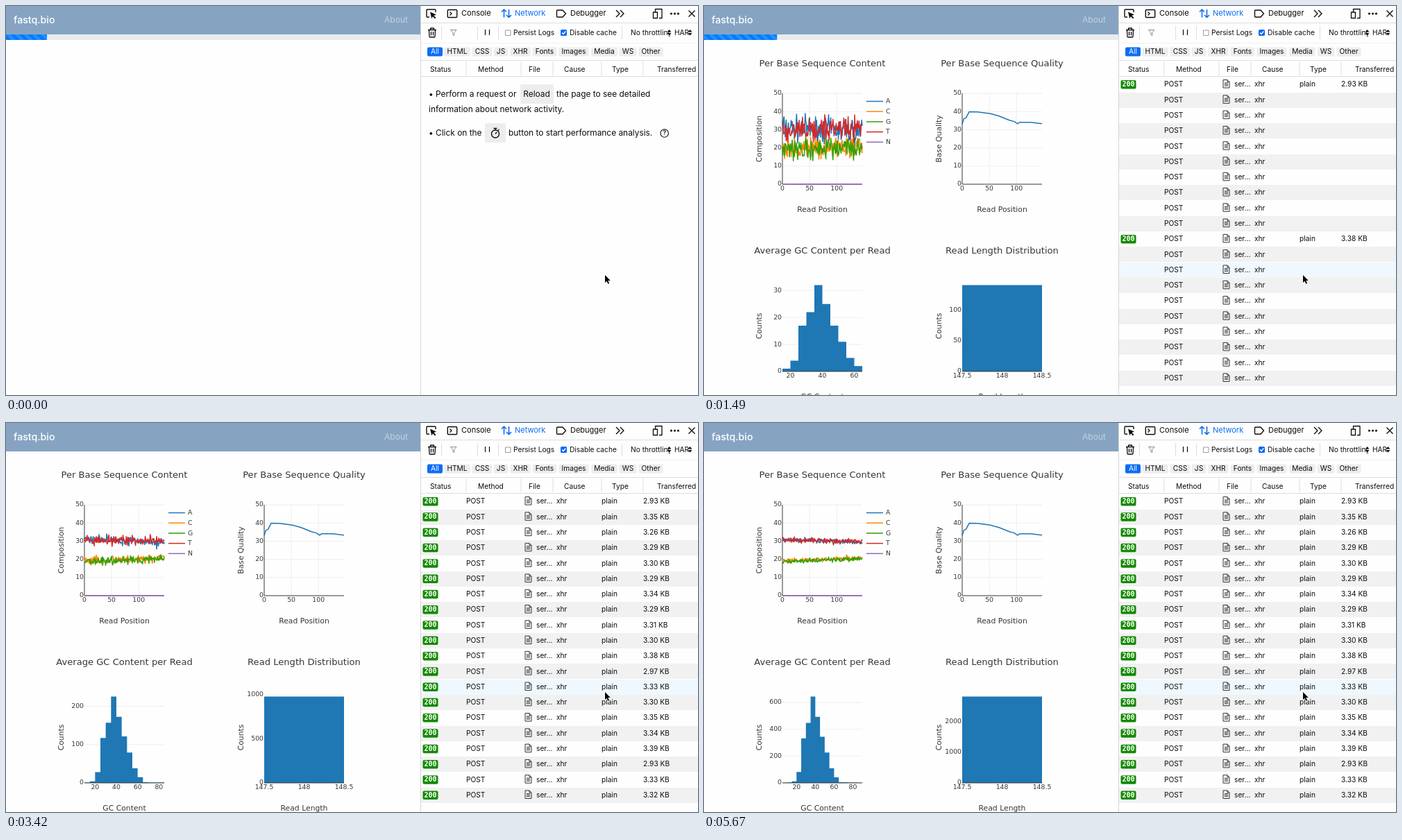
An HTML page with a canvas that plays this animation: 997x561 px, repeating every 8.67 s.

```html
<!DOCTYPE html>
<html lang="en">
<head>
<meta charset="utf-8">
<title>fastq.bio</title>
<style>
html, body { margin: 0; width: 100%; height: 100%; overflow: hidden; background: #fefefe; }
canvas { display: block; }
</style>
</head>
<body>
<canvas width="997" height="561"></canvas>
<script>
const ctx = document.querySelector('canvas').getContext('2d');
const LOOP = 8670, TICK = 149.2;
const UI = 'Inter, "Open Sans", sans-serif';
const PLOT = '"DejaVu Sans", sans-serif';
const MONO = '"DejaVu Sans Mono", monospace';
const INK = '#0c0c0d', BLUE = '#0a6cf5', LINE = '#dedee0', CHIP = '#ededee', AXIS = '#363636', BAR = '#1f77b4';

const SIZES = '2.93 3.35 3.26 3.29 3.30 3.29 3.34 3.29 3.31 3.30 3.38 2.97 3.33 3.30 3.35 3.34 3.39 2.93 3.33 3.32'.split(' ');
const EARLY = [0, 10], LATE = [1, 3, 4, 6, 12, 13, 17, 18];

// name, colour, mean at the first and last position, spread of one batch
const BASES = [
  ['A', BAR, 31, 29.2, 3.4], ['C', '#ff8800', 19.3, 20.8, 2.9],
  ['G', '#33a000', 18.9, 20.3, 2.9], ['T', '#d62728', 30.6, 30.1, 3.4], ['N', '#9467bd', 0, 0, 0]
];
const POSITIONS = 148, BATCH = 140, BATCHES = 20, PLOT_W = 115, PLOT_H = 131;

// key points of curves, linear in between
const QUALITY = [[0, 33], [3, 36], [7, 36.5], [13, 39.9], [28, 39.8], [52, 38.8], [68, 37.5],
  [87, 35.2], [96, 34.5], [102, 33.3], [106, 34.1], [126, 34.1], [147, 33.3]];
const GC_SHARE = [[2.5, 0], [7.5, .0002], [12.5, .0007], [17.5, .004], [22.5, .029], [27.5, .119], [32.5, .16], [37.5, .23],
  [42.5, .176], [47.5, .123], [57.5, .039], [62.5, .015], [67.5, .0017], [82.5, .001], [87.5, .0002], [92.5, 0]];
const PROGRESS = [[0, 59], [5, 60], [7, 83], [12, 120], [15, 211], [18, 418], [20, 560]];

function interpolate(points, x) {
  const i = points.findIndex(p => p[0] >= x);
  if (i < 1) return points.at(i)[1];
  const [[x0, y0], [x1, y1]] = points.slice(i - 1);
  return y0 + (y1 - y0) * (x - x0) / (x1 - x0);
}

let seed = 7;
const random = () => (seed = (seed * 16807) % 2147483647) / 2147483647;
const gauss = () => (random() + random() + random() - 1.5) * 2;

const replyTick = SIZES.map((_, i) =>
  EARLY.includes(i) ? 7 : (LATE.includes(i) ? 16 : 12) + Math.floor(random() * 3));

// running means: series[base][batches] is a list of [position, value]
const series = BASES.map(([, , from, to, spread]) => {
  const sums = Array(POSITIONS).fill(0), means = [[]];
  for (let k = 1; k <= BATCHES; k++) {
    means.push(sums.map((_, i) => {
      sums[i] += gauss() * spread;
      return [i, from + (to - from) * i / POSITIONS + sums[i] / k];
    }));
  }
  return means;
});

function rect(x, y, w, h, color, r = 0) {
  ctx.fillStyle = color;
  ctx.beginPath();
  ctx.roundRect(x, y, w, h, r);
  ctx.fill();
}

function text(s, x, y, size, color = INK, align = 'left', font = UI, weight = 400) {
  ctx.font = `${weight} ${size}px ${font}`;
  ctx.fillStyle = color;
  ctx.textAlign = align;
  ctx.textBaseline = 'middle';
  ctx.fillText(s, x, y);
}

const label = (s, x, y, size = 9.3, align = 'center') => text(s, x, y, size, AXIS, align, PLOT);

function stroke(d, color = INK, width = 1.4) {
  ctx.strokeStyle = color;
  ctx.lineWidth = width;
  ctx.lineJoin = 'round';
  ctx.stroke(new Path2D(d));
}

function fill(d, color = INK) {
  ctx.fillStyle = color;
  ctx.fill(new Path2D(d));
}

function clipped(x, y, w, h, paint) {
  ctx.save();
  ctx.beginPath();
  ctx.rect(x, y, w, h);
  ctx.clip();
  paint();
  ctx.restore();
}

function niceStep(range) {
  const rough = range / 4.2, power = 10 ** Math.floor(Math.log10(rough));
  return power * [1, 2, 5, 10].find(m => m * power >= rough);
}

function frame(left, base, title, xTitle, yTitle) {
  const middle = left + PLOT_W / 2;
  label(title, middle, base - 173.5, 13.1);
  label(xTitle, middle, base + 37, 10.8);
  ctx.save();
  ctx.translate(left - 33, base - PLOT_H / 2);
  ctx.rotate(-Math.PI / 2);
  label(yTitle, 0, 0, 10.8);
  ctx.restore();
}

function yGrid(left, base, step, max, scale) {
  for (let v = 0; v <= max; v += step) {
    if (v) rect(left, base - v * scale - .5, PLOT_W, 1, '#eee');
    label(v, left - 1, base - v * scale, 9.3, 'right');
  }
}

function lineChart(left, base, curves) {
  const dx = PLOT_W / (POSITIONS - 1), dy = PLOT_H / 50;
  for (const v of [0, 50, 100]) {
    if (v) rect(left + v * dx - .5, base - PLOT_H, 1, PLOT_H, '#eee');
    label(v, left + v * dx, base + 7);
  }
  yGrid(left, base, 10, 50, dy);
  stroke(`M${left} ${base - PLOT_H}V${base}H${left + PLOT_W}`, AXIS, 1);
  for (const [points, color] of curves)
    stroke('M' + points.map(([i, v]) => [left + i * dx, base - v * dy]).join('L'), color, 1.5);
}

function histogram(left, base, counts) {
  const max = Math.max(...counts), range = max / .95, scale = PLOT_H / range, w = PLOT_W / counts.length;
  yGrid(left, base, niceStep(range), range, scale);
  fill(`M${left} ${base}` + counts.map((v, i) => `V${base - v * scale}H${left + (i + 1) * w}`).join('') + `V${base}Z`, BAR);
  stroke(`M${left} ${base}h${PLOT_W}`, AXIS, 1);
}

function charts(k, dy) {
  const top = 249 + dy, low = 519 + dy, reads = BATCH * k;

  frame(113, top, 'Per Base Sequence Content', 'Read Position', 'Composition');
  lineChart(113, top, BASES.map(([, color], j) => [series[j][k], color]));
  BASES.forEach(([name, color], i) => {
    const y = top - 119.5 + i * 14.7;
    stroke(`M234 ${y}h24`, color, 1.5);
    label(name, 262, y + .3, 9.3, 'left');
  });

  frame(372, top, 'Per Base Sequence Quality', 'Read Position', 'Base Quality');
  lineChart(372, top, [[QUALITY, BAR]]);

  frame(113, low, 'Average GC Content per Read', 'GC Content', 'Counts');
  const bins = [];
  for (let x = 0; x < 95; x += 5) {
    const count = Math.round(interpolate(GC_SHARE, x + 2.5) * reads);
    bins.push({ x, count });
  }
  const first = bins.findIndex(b => b.count), last = bins.findLastIndex(b => b.count);
  const start = bins[first].x, end = bins[last].x + 5;
  histogram(113, low, bins.slice(first, last + 1).map(b => b.count));
  for (let v = 20; v < end; v += 20) label(v, 113 + (v - start) / (end - start) * PLOT_W, low + 7);

  frame(372, low, 'Read Length Distribution', 'Read Length', 'Counts');
  histogram(372, low, [reads]);
  [147.5, 148, 148.5].forEach((v, i) => label(v, 372 + i * PLOT_W / 2, low + 7));
}

function progress(tick) {
  const width = interpolate(PROGRESS, tick), tile = 12.4;
  rect(0, 41, 597, 8, '#e9ecef');
  rect(0, 41, width, 8, '#007bff');
  clipped(0, 41, width, 8, () => {
    const shift = tick * TICK / 1000 % 1 * tile;
    for (let x = -tile - shift; x < width; x += tile)
      fill(`M${x} 41h${tile / 2}l8 8h${-tile / 2}Z`, 'rgba(255,255,255,.15)');
  });
}

function tabs() {
  stroke('M619 9V6q0-1-1-1h-11q-1 0-1 1v9q0 1 1 1h3');
  fill('M611 8.5l9 4-3.6 1.2 3 3.2-1.5 1.4-3-3.2-1.6 3.2Z');
  stroke('M637.5 5.5h11q1.2 0 1.2 1.2v8.6q0 1.2-1.2 1.2h-11q-1.2 0-1.2-1.2V6.7q0-1.2 1.2-1.2ZM639.5 8.5l2.5 2.5-2.5 2.5');
  text('Console', 656, 11, 11);
  stroke('M717.5 16.5V5M714 8.5l3.5-3.5 3.5 3.5M724.5 5v11.5M721 13l3.5 3.5 3.5-3.5', BLUE, 1.6);
  text('Network', 733, 11, 11, BLUE);
  stroke('M794.5 6h7.5l4.5 5-4.5 5h-7.5q-1 0-1-1V7q0-1 1-1Z');
  text('Debugger', 813, 11, 11);
  stroke('M879 6l5 5-5 5M885 6l5 5-5 5');
  stroke('M935.5 8.5v-4h9.5v13h-4M932.5 9h6v8.500h-6Z', INK, 1.3);
  for (const x of [958.5, 963.5, 968.5]) rect(x - 1.6, 9.4, 3.2, 3.2, INK, 1.6);
  stroke('M983.5 6.5l9 9m0-9l-9 9');
}

function options() {
  stroke('M608 34.5h12M611.5 34v-2h5v2M609.5 35l.5 9q0 1 1 1h6q1 0 1-1l.5-9M612.5 37v5.5M615.5 37v5.5', INK, 1.3);
  stroke('M640.5 34.5h8.5l-3.2 4v4l-2-1v-3Z', '#8d8d92', 1);
  stroke('M690.5 34v8m6-8v8', INK, 1.2);
  for (const x of [627, 679, 709, 887]) rect(x, 29, 1, 19, LINE);
  stroke('M719.5 35h7.5v7.5h-7.5Z', '#9a9aa0', 1);
  text('Persist Logs', 731, 38.5, 10.2);
  rect(799, 34, 9, 9, BLUE, 1.5);
  stroke('M801 38.5l2 2 3.3-4', '#fff', 1.3);
  text('Disable cache', 812, 38.5, 10.2);
  clipped(890, 26, 67, 26, () => text('No throttling', 900, 38.5, 10.2));
  text('HAR', 963, 38.5, 10.2);
  for (const x of [955.5, 985.5]) fill(`M${x - 3} 37.5l3-3.5 3 3.5ZM${x - 3} 39l3 3.5 3-3.5Z`);
}

function toolbar() {
  for (const y of [24, 53, 78, 101]) rect(598, y, 399, 1, y === 53 ? '#f1f1f2' : LINE);
  tabs();
  options();

  const filters = { All: 618, HTML: 650, CSS: 686, JS: 713, XHR: 741, Fonts: 776, Images: 818, Media: 862, WS: 896, Other: 929 };
  for (const [name, x] of Object.entries(filters)) {
    ctx.font = `10.2px ${UI}`;
    const w = ctx.measureText(name).width + 8, on = name === 'All';
    rect(x - w / 2 - on, 59.5, w + 2 * on, 13, on ? BLUE : CHIP, 2);
    text(name, x, 66, 10.2, on ? '#fff' : INK, 'center');
  }

  const heads = { Status: 611, Method: 680, File: 753, Cause: 804, Type: 873, Transferred: 938 };
  for (const [name, x] of Object.entries(heads)) text(name, x, 91.5, 10.2);
  for (const x of [663, 742, 788, 858, 918]) rect(x - .5, 80, 1, 20, LINE);
}

function hints() {
  text('• Perform a request or', 609, 127.5, 11.9);
  rect(741, 113, 48, 28, CHIP, 2);
  text('Reload', 764.5, 127.5, 11.9, INK, 'center');
  text('the page to see detailed', 793, 127.5, 11.9);
  text('information about network activity.', 609, 149, 11.9);
  text('• Click on the', 609, 183, 11.9);
  rect(690, 169, 30, 28, CHIP, 2);
  stroke('M699.5 184.5a5.5 5.5 0 1 0 11 0a5.5 5.5 0 1 0-11 0M702.5 176.5h5M705 176.5v2.5M709 179.5l1.5-1.5M705 184.5l2-2.5');
  text('button to start performance analysis.', 724, 183, 11.9);
  stroke('M943 183.5a5.7 5.7 0 1 0 11.4 0a5.7 5.7 0 1 0-11.4 0', INK, 1.1);
  text('?', 948.7, 183.7, 8.5, INK, 'center', UI, 600);
}

function requests(tick) {
  SIZES.slice(0, tick * 7).forEach((size, i) => {
    const y = 113.3 + i * 22.29, hover = i === 12;
    if (i % 2 || hover) rect(598, Math.round(y - 11), 399, 22, hover ? '#eff8fe' : '#f1f1f1');
    text('POST', 663, y, 10.2);
    stroke(`M748 ${y - 6.8}h6l3 3v8.5h-9ZM754 ${y - 6.8}v3h3M749.8 ${y - 2.3}h5.4m-5.4 2h5.4m-5.4 2h5.4`, '#333', 1);
    text('ser...', 764, y, 10.2);
    text('xhr', 793, y, 10.2);
    if (tick < replyTick[i]) return;
    rect(600.5, y - 6.3, 22, 12.5, '#128a00', 2);
    text('200', 611.5, y + .2, 10, '#fff', 'center', MONO, 700);
    text('plain', 858, y, 10.2);
    text(size + ' KB', 918, y, 10.2);
  });
}

function cursor() {
  const d = 'M863 388v11l2.5-2.300 1.900 4.100 1.800-.8-1.900-4h3.500Z';
  stroke(d, '#fff', 1.6);
  fill(d, '#000');
}

function draw(time) {
  const tick = Math.floor((time + 5) / TICK);
  const loading = tick < 21;
  // steady growth up to the last batch at tick 38
  const batches = Math.min(BATCHES, Math.max(1, Math.floor(20.02 - .782 * (38 - tick))));

  rect(0, 0, 997, 561, '#fefefe');
  if (tick >= 10) charts(batches, loading ? 8 : 0);
  rect(0, 0, 597, 41, '#86a4c2');
  text('fastq.bio', 11, 20.5, 14.2, '#fff', 'left', UI, 500);
  text('About', 579, 20, 12.1, '#c3d1e0', 'right');
  if (loading) progress(tick);
  rect(597, 0, 1, 561, '#d5d5d8');
  toolbar();
  if (tick) requests(tick);
  else hints();
  cursor();
}

const origin = performance.now();
function animate() {
  draw((performance.now() - origin) % LOOP);
  requestAnimationFrame(animate);
}
animate();
</script>
</body>
</html>
```
